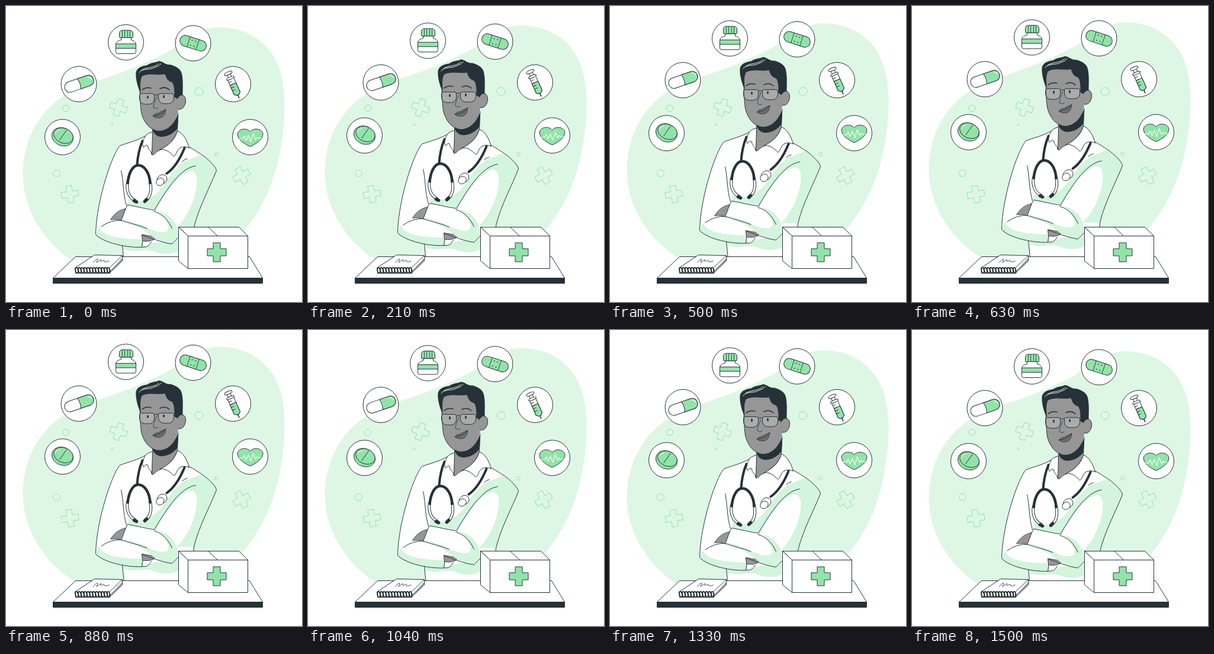
An HTML page with a canvas that plays this animation: 500x500 px, repeating every 1540 ms.

```html
<!DOCTYPE html>
<html lang="en">
<head>
<meta charset="utf-8">
<title>Doctor</title>
<style>
html, body { margin: 0; width: 100%; height: 100%; overflow: hidden; background: #fff; }
canvas { display: block; width: 500px; height: 500px; }
</style>
</head>
<body>
<canvas id="stage"></canvas>
<script>
const INK = '#263238', GREEN = '#92e3a9', PALE = '#def7e5', SHADE = '#d3f4dd';
const SKIN = '#969696', LIP = '#6e6e6e', WHITE = '#fff';
const LOOP = 1540, FPS = 24, CYCLE = 36, RISE = 10;

const canvas = document.getElementById('stage');
const ctx = canvas.getContext('2d');
const ratio = window.devicePixelRatio || 1;
canvas.width = canvas.height = 500 * ratio;

function paint(path, fill, stroke, width = 1) {
  if (fill) { ctx.fillStyle = fill; ctx.fill(path); }
  if (stroke) { ctx.strokeStyle = stroke; ctx.lineWidth = width; ctx.stroke(path); }
}
const shape = (d, fill, stroke, width) => paint(new Path2D(d), fill, stroke, width);
const line = (d, stroke = INK, width = 1) => shape(d, null, stroke, width);

function oval(x, y, rx, ry, turn, fill, stroke, width) {
  const path = new Path2D();
  path.ellipse(x, y, rx, ry, turn, 0, Math.PI * 2);
  paint(path, fill, stroke, width);
}
const circle = (x, y, r, fill, stroke, width) => oval(x, y, r, r, 0, fill, stroke, width);

function bar(x, y, w, h, r, fill, stroke) {
  const path = new Path2D();
  path.roundRect(x, y, w, h, r);
  paint(path, fill, stroke);
}

function at(x, y, degrees, draw) {
  ctx.save();
  ctx.translate(x, y);
  ctx.rotate(degrees * Math.PI / 180);
  draw();
  ctx.restore();
}

function cross(x, y, degrees, a, b, fill, stroke) {
  at(x, y, degrees, () => shape(
    `M${-b} ${-a}H${b}V${-b}H${a}V${b}H${b}V${a}H${-b}V${b}H${-a}V${-b}H${-b}Z`, fill, stroke));
}

function drawBlob() {
  shape('M355 36C410 34 452 66 464 115C475 158 470 214 459 262C447 312 428 348 402 380' +
    'C372 414 330 450 250 458C190 464 140 448 108 428C62 396 28 342 28 285' +
    'C28 232 50 185 92 155C126 132 172 122 208 107C238 95 264 83 287 69C308 54 326 38 355 36Z', PALE);
}

function drawDecor() {
  [[325.5, 144, 7], [100.5, 172.5, 5.5], [179, 200, 1.6], [85, 282, 6], [355, 250, 3]]
    .forEach(([x, y, r]) => circle(x, y, r, null, GREEN));
  [[189.5, 171, 18], [107.5, 317.5, -9], [397.5, 286, -28]]
    .forEach(([x, y, turn]) => cross(x, y, turn, 14.5, 5, null, GREEN));
}

function drawCoat() {
  const coat = 'M236 219C220 228 205 231 192 236C178 252 152 330 151 386' +
    'C160 394 177 400 196 404L200 445H310L317 374C325 340 345 304 355 278' +
    'C354 270 336 254 325 248C318 243 312 240 305 236L290 212L247 252Z';
  shape(coat, WHITE);
  shape('M302 262C311 259 320 255 330 251C343 259 353 269 355 278C345 304 325 340 317 374H288' +
    'C306 358 322 322 322 296C322 284 317 277 308 280C288 287 268 316 252 345' +
    'L206 336V326C222 336 246 326 260 310C272 296 280 276 302 262Z', SHADE);
  shape('M196 402L242 404C252 397 264 399 281 402L292 394V413' +
    'C280 421 262 420 250 415C238 410 224 414 212 414L198 411Z', SHADE);
  line(coat);
  line('M194 278C198 295 197 318 203 337M320 270C294 274 272 308 250 345M297 263Q301 259 306 258');
}

function drawArms() {
  shape('M160 372C172 362 188 360 198 362L247 388C245 398 242 405 236 407C205 409 170 402 151 386Z', WHITE);
  shape('M158 373C158 386 184 394 230 394L232 407C200 408 165 400 151 386Q153 377 158 373Z', SHADE);
  line('M151 386C164 400 205 410 236 407Q242 405 245 398M160 373Q176 361 196 362');
  line('M229 386Q232 396 229 407');
  shape('M229 386L253 390L249 395Q240 399 230 397Z', SKIN, INK, .8);
  shape('M176 361C183 350 190 345 202 342L196 363Q187 359 176 361Z', SKIN, INK, .8);
  shape('M205 336C225 340 246 342 262 346C278 353 290 370 291 391L280 402' +
    'C266 399 250 394 240 383C226 373 210 368 194 362C199 352 200 344 205 336Z', WHITE);
  shape('M256 346C280 353 291 370 291 392L280 402C266 400 252 395 240 384' +
    'C225 373 210 367 196 361C218 363 236 376 254 381C270 385 278 380 272 368C268 358 262 351 256 346Z', SHADE);
  line('M291 391L280 402C264 400 250 394 230 387M252 345C236 343 222 339 205 336' +
    'C200 344 199 352 194 362C210 368 224 370 238 376M249 347C263 350 274 362 280 376');
}

function drawNeck() {
  shape('M247 208L245 250Q248 254 253 247C270 239 283 228 289 212L290 190Z', SKIN, INK, .8);
  shape('M246 207C264 216 282 204 291 180L289 207C281 216 272 221 261 221Q250 220 246 207Z', INK);
  shape('M247 213Q237 215 234 221C230 229 229 234 232 239Q236 233 239 236C239 243 244 242 246 251Z', WHITE, INK);
  shape('M289 211C299 215 305 226 309 240C301 236 294 238 290 243C287 247 287 252 283 254' +
    'C277 247 267 240 259 243C274 236 285 226 289 211Z', WHITE, INK);
}

function drawStethoscope() {
  ctx.lineCap = 'round';
  line('M230 228C224 242 222 254 221 268M301 240C294 257 284 274 271 283', INK, 4);
  const tubes = 'M205 298C202 312 208 324 217 328M243 298C246 312 243 323 236 328';
  line(tubes, INK, 5);
  line(tubes, WHITE, 3);
  line('M205 299C207 281 214 269 223 269C234 269 242 283 243 299', INK, 4.5);
  line('M216 329L220 331M237 327L234 330', INK, 5.5);
  ctx.lineCap = 'butt';
  oval(263, 293, 9, 7.5, -.7, WHITE, INK);
  oval(260, 297, 7, 6, -.6, WHITE, INK);
}

function drawHead() {
  shape('M290 153C297 147 304 152 303 162C301 172 296 176 289 174Z', SKIN, INK);
  shape('M226 116C225 145 226 164 228 180C232 196 241 207 252 210C268 214 284 202 290 181' +
    'L291 150L284 120L258 108Z', SKIN);
  line('M226 121C225 145 226 164 228 180C232 196 241 207 252 210');
  shape('M227 148C222 137 218 123 219 112C221 104 229 101 238 100C244 95 251 96 258 93' +
    'C265 94 270 100 277 99C288 102 296 107 297 117C299 128 298 141 298 151' +
    'Q293 150 289 157L284 154C284 143 284 134 280 129C273 127 270 122 268 115' +
    'C256 118 240 112 229 119C225 128 227 138 227 148Z', INK);
  line('M224 113C231 104 242 109 250 104Q258 102 262 97M228 109C237 102 249 106 258 97', WHITE, .9);

  ctx.globalAlpha = .2;
  bar(225, 148, 25, 18, [3, 3, 9, 9], WHITE);
  bar(257, 148, 26, 17, [3, 3, 9, 9], WHITE);
  ctx.globalAlpha = 1;
  bar(225, 148, 25, 18, [3, 3, 9, 9], null, INK);
  bar(257, 148, 26, 17, [3, 3, 9, 9], null, INK);
  line('M250 151Q254 148 257 151M283 151L291 154');
  line('M229 142Q236 136 245 139M259 140Q268 135 276 142', INK, 1.5);
  oval(239, 154, 1.4, 2.8, 0, INK);
  oval(266, 153, 1.4, 2.8, 0, INK);
  line('M254 153C252 160 247 168 249 172Q253 175 257 172', INK, .8);
  shape('M248 186C251 180 256 183 260 179Q265 177 269 175C269 184 264 190 256 189Q251 189 248 186Z', LIP, INK, .8);
  line('M247 186C257 185 264 182 270 174');
}

function drawDoctor() {
  drawCoat();
  drawArms();
  drawNeck();
  drawStethoscope();
  drawHead();
}

function bottle() {
  shape('M-8 -8H9V-4C14 -3 17 0 17 4V16Q17 19 14 19H-14Q-17 19 -17 16V4C-17 0 -14 -3 -8 -4Z', WHITE, INK);
  shape('M-17 2.5H17V10H-17Z', GREEN, INK);
  bar(-11, -20.5, 23, 12.5, [5, 5, 1, 1], GREEN, INK);
  line('M-6 -20V-8M-2 -20V-8M3 -20V-8M7 -20V-8', INK, .8);
}

function bandage() {
  at(0, 0, 18, () => {
    bar(-23, -9, 46, 18, 9, GREEN, INK);
    line('M-8 -9V9M8 -9V9', INK, .8);
    for (const x of [-3, 3]) for (const y of [-4.5, 4.5]) circle(x, y, .9, INK);
  });
}

function capsule() {
  at(.5, -.5, -19, () => {
    bar(-25.5, -9, 51, 18, 9, WHITE, INK);
    shape('M0 -9H16.5A9 9 0 0 1 16.5 9H0Q3 0 0 -9Z', GREEN, INK);
    line('M17 -6Q22 -5 23 0', WHITE);
  });
}

function syringe() {
  at(0, 0, -24, () => {
    shape('M-3 -20H3V-12H-3Z', WHITE, INK);
    oval(0, -20, 7, 2.5, 0, WHITE, INK);
    shape('M-5.5 -11H5.5V17L2 20H-2L-5.5 17Z', WHITE, INK);
    shape('M-5.5 0H5.5V17L2 20H-2L-5.5 17Z', GREEN, INK);
    oval(0, -11, 7, 2, 0, WHITE, INK);
    line('M-5 -5H0M-5 0H0M-5 5H0M-5 10H0');
    line('M0 20V26', INK, 1.6);
  });
}

function tablet() {
  oval(0, -.5, 18.5, 15, .4, GREEN, INK);
  oval(1.5, -2.5, 17, 12.5, .4, GREEN, INK);
  line('M-5 5L7 -12');
  line('M-13 -5Q-11 -11 -4 -12', WHITE, .8);
}

function heart() {
  shape('M0 -9C5 -16 19 -15 21.5 -6C22 4 9 12 0 16C-9 12 -22 4 -21.5 -6C-19 -15 -5 -16 0 -9Z', GREEN, INK);
  line('M-20 3H-13L-10 -2L-7 6L-3 -3L1 8L5 -6L9 4L12 0L14 2H19', WHITE, 1.1);
}

const badges = [
  [202, 61.5, bottle], [315.5, 63, bandage], [122.5, 132, capsule],
  [383, 132, syringe], [95, 221.5, tablet], [412, 221.5, heart]
];

function drawBadges() {
  for (const [x, y, icon] of badges) at(x, y, 0, () => {
    circle(0, 0, 30, WHITE, INK);
    icon();
  });
}

function drawTable() {
  shape('M117 423H411L433 459H79Z', WHITE, INK);
  shape('M79 459H433V468H79Z', INK, INK);
}

function drawNotebook() {
  shape('M116 442L149 420L196 421V430L174 451H117Z', WHITE, INK);
  line('M117 442H174L196 421M174 442V451M176 447L196 426M176 449L196 428', INK, .9);
  for (let i = 0; i < 12; i++) oval(119 + i * 4.9, 446, 2.2, 4.8, -.2, null, INK, 1.7);
  line('M147 433C152 426 157 425 153 431C150 436 158 428 160 428C158 434 163 429 165 429Q165 434 174 430', INK, .9);
}

function drawBox() {
  shape('M291 373H393L408 388H307Z', WHITE, INK);
  shape('M291 373L307 388V443L291 430Z', WHITE, INK);
  shape('M307 388H408V443H307Z', WHITE, INK);
  line('M341 373L357 388');
  cross(355.5, 415.5, 0, 16, 6, GREEN, INK);
}

function drawDesk() {
  drawTable();
  drawNotebook();
  drawBox();
}

// Rises and sinks at constant speed, stepped at the film rate.
function liftAt(time) {
  const step = Math.floor((time % LOOP + 6) * FPS / 1000);
  const phase = (step + .6) / CYCLE % 1;
  return RISE * (1 - Math.abs(1 - 2 * phase));
}

function draw(time) {
  const lift = liftAt(time);
  const floating = part => at(.5, .3 - lift, 0, part);
  ctx.setTransform(ratio, 0, 0, ratio, 0, 0);
  ctx.fillStyle = WHITE;
  ctx.fillRect(0, 0, 500, 500);
  ctx.lineJoin = 'round';
  floating(drawBlob);
  at(.5, .5, 0, drawDecor);
  floating(drawDoctor);
  floating(drawBadges);
  at(.5, .5, 0, drawDesk);
}

const start = performance.now();
function tick() {
  draw(performance.now() - start);
  requestAnimationFrame(tick);
}
tick();
</script>
</body>
</html>
```
